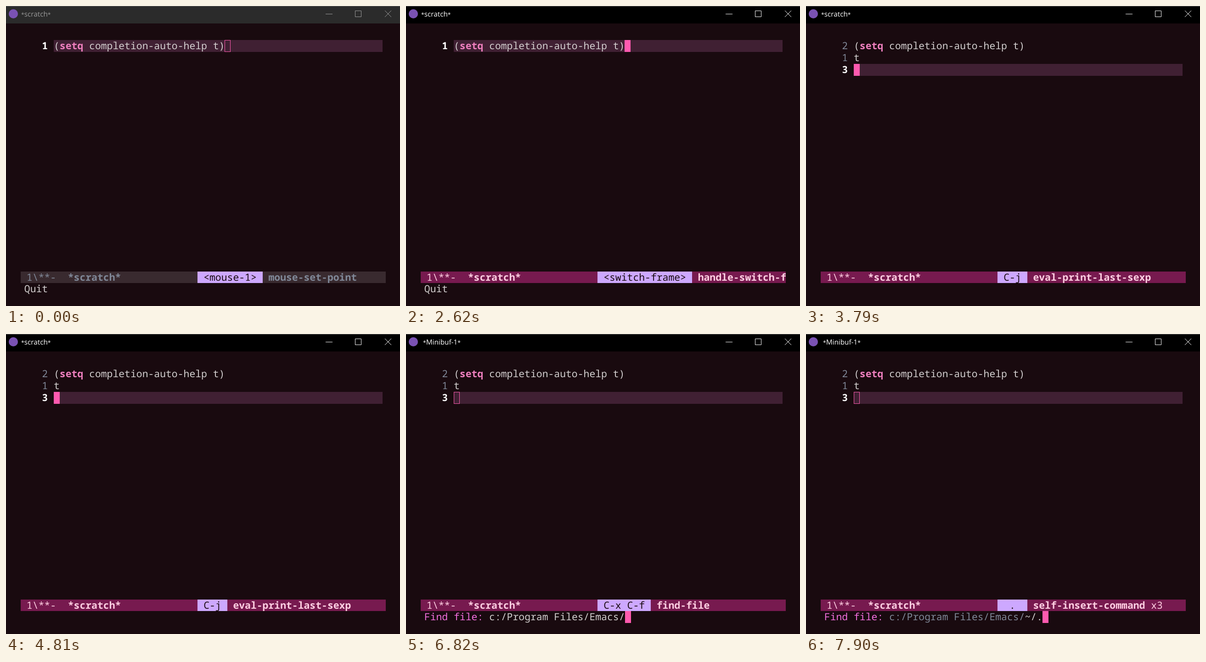
These frames come from a looping animation (858 by 653 pixels, 8 s). An HTML page:

```html
<!DOCTYPE html>
<html lang="en">
<head>
<meta charset="utf-8">
<title>Editor completion demo</title>
<style>
:root { --w: 12.845px; --bg: #190a0f; --fg: #d3cfcf; --dim: #808898; --pink: #ff5aaf; }
html, body { margin: 0; width: 858px; height: 653px; overflow: hidden; background: var(--bg); }
body {
  position: relative; color: var(--fg); white-space: pre;
  font: 21.41px/26px "Noto Sans Mono", "DejaVu Sans Mono", monospace;
  font-variant-ligatures: none; text-rendering: geometricPrecision;
}
div, svg, .at { position: absolute; }
b { font-weight: 700; }

/* every animated part jumps between states on one shared clock */
.bar, .mode, .show, .typed { animation: 8s step-end infinite; }

.bar { inset: 0 0 auto; height: 38px; animation-name: bar; }
.edge { inset: 0 0 auto; height: 1px; background: #5c5c5c; }
.icon { left: 6px; top: 7px; width: 20px; height: 20px; border-radius: 50%; background: #7a52b3; }
.title { top: 5px; font: 15.3px/26px "Open Sans", "Noto Sans", sans-serif; }
.title i { font: 12.2px/1 "Open Sans", "Noto Sans", sans-serif; }
.bar svg { left: 690px; top: 0; fill: none; stroke: currentColor; }

.num { left: 78.3px; }
.dim { color: var(--dim); }
.now { color: #fff; font-weight: 700; }
.code { left: 104px; }
.code b { color: #ef80bf; }
.line { left: 104px; width: 715.5px; height: 26px; background: #402033; }
.cursor { width: 13px; height: 26px; background: var(--pink); }
.hollow { box-sizing: border-box; background: none; border: 1px solid var(--pink); }
.r1 { top: 74px; } .r2 { top: 100px; } .r3 { top: 126px; }
.end { left: 476px; }

.mode { left: 32px; top: 578px; width: 795px; height: 25px; overflow: hidden; animation-name: mode; }
.key { left: calc(30 * var(--w)); top: 0; }
.key span { display: inline-block; background: #cda8ff; color: #190a0f; }

.mini { left: 39.8px; top: 603px; }
.prompt { color: #f470df; }
.typed { left: calc(34 * var(--w)); overflow: hidden; height: 26px; animation-name: typed; }
.mini .cursor { top: 0; animation-name: blink-mini; }

.blurred { animation-name: blurred; }
.switch { animation-name: switch; }
.before { animation-name: before; }
.after { animation-name: after; }
.eval { animation-name: eval; }
.main { animation-name: main; }
.find { animation-name: find; }
.opened { animation-name: opened; }
.tilde { animation-name: tilde; }
.slash { animation-name: slash; }
.dot { animation-name: dot; }
.shadow { animation-name: shadow; }
.blink1 { animation-name: blink1; }
.blink3 { animation-name: blink3; }

@keyframes bar {
  0% { background: #2b2b2b; color: #9a9a9a; }
  14.75%, 100% { background: #000; color: #fff; }
}
@keyframes mode {
  0% { background: #392a2f; color: var(--dim); }
  14.75%, 100% { background: #771a4f; color: #ffcfe2; }
}
@keyframes typed {
  0% { width: 0; }
  94.125% { width: var(--w); }
  97.25% { width: calc(2 * var(--w)); }
  98.75%, 100% { width: calc(3 * var(--w)); }
}
@keyframes blurred { 0% { opacity: 1; } 14.75%, 100% { opacity: 0; } }
@keyframes switch { 0%, 47.375%, 100% { opacity: 0; } 14.75% { opacity: 1; } }
@keyframes before { 0% { opacity: 1; } 47.375%, 100% { opacity: 0; } }
@keyframes after { 0% { opacity: 0; } 47.375%, 100% { opacity: 1; } }
@keyframes eval { 0%, 73.375%, 100% { opacity: 0; } 47.375% { opacity: 1; } }
@keyframes main { 0% { opacity: 1; } 73.375%, 100% { opacity: 0; } }
@keyframes find { 0% { opacity: 0; } 73.375%, 100% { opacity: 1; } }
@keyframes opened { 0%, 94.125%, 100% { opacity: 0; } 73.375% { opacity: 1; } }
@keyframes tilde { 0%, 97.25%, 100% { opacity: 0; } 94.125% { opacity: 1; } }
@keyframes slash { 0%, 98.75%, 100% { opacity: 0; } 97.25% { opacity: 1; } }
@keyframes dot { 0% { opacity: 0; } 98.75%, 100% { opacity: 1; } }
@keyframes shadow { 0% { color: var(--fg); } 94.125%, 100% { color: var(--dim); } }
@keyframes blink1 {
  0%, 26.375%, 39%, 47.375%, 100% { opacity: 0; }
  21.75%, 32.75%, 45.5% { opacity: 1; }
}
@keyframes blink3 {
  0%, 53.625%, 66.375%, 100% { opacity: 0; }
  47.375%, 60.125% { opacity: 1; }
}
@keyframes blink-mini {
  0%, 80%, 92.25% { opacity: 0; left: calc(34 * var(--w)); }
  73.375%, 85.25% { opacity: 1; left: calc(34 * var(--w)); }
  94.125% { opacity: 1; left: calc(35 * var(--w)); }
  97.25% { opacity: 1; left: calc(36 * var(--w)); }
  98.75%, 100% { opacity: 1; left: calc(37 * var(--w)); }
}
</style>
</head>
<body>
<div class="bar"><div class="icon"></div><div class="title show main" style="left:33px"><i>*</i>scratch<i>*</i></div><div class="title show find" style="left:37px"><i>*</i>Minibuf-1<i>*</i></div><svg width="168" height="38"><path d="M6 17.5h15M70.5 10.5h13v13h-13zM135 10l14 14M149 10l-14 14"/></svg></div>
<div class="edge"></div>

<div class="line r1 show before"></div>
<div class="line r3 show after"></div>
<div class="cursor end r1 show blink1"></div>
<div class="cursor hollow end r1 show blurred"></div>
<div class="cursor r3 show blink3" style="left:104px"></div>
<div class="cursor hollow r3 show find" style="left:104px"></div>

<div class="num now r1 show before">1</div>
<div class="num dim r1 show after">2</div>
<div class="num dim r2 show after">1</div>
<div class="num now r3 show after">3</div>
<div class="code r1">(<b>setq</b> completion-auto-help t)</div>
<div class="code r2 show after">t</div>

<div class="mode"> 1\**-  <b>*scratch*</b><div class="key show blurred"><span> &lt;mouse-1&gt; </span><b> mouse-set-point</b></div><div class="key show switch"><span> &lt;switch-frame&gt; </span><b> handle-switch-frame</b></div><div class="key show eval"><span> C-j </span><b> eval-print-last-sexp</b></div><div class="key show opened"><span> C-x C-f </span><b> find-file</b></div><div class="key show tilde"><span>  ~  </span><b> self-insert-command</b></div><div class="key show slash"><span>  /  </span><b> self-insert-command</b> x2</div><div class="key show dot"><span>  .  </span><b> self-insert-command</b> x3</div></div>

<div class="mini show before">Quit</div>
<div class="mini show find"><span class="prompt">Find file: </span><span class="show shadow">c:/Program Files/Emacs/</span><div class="typed" style="top:0">~/.</div><div class="cursor show"></div></div>
</body>
</html>
```
